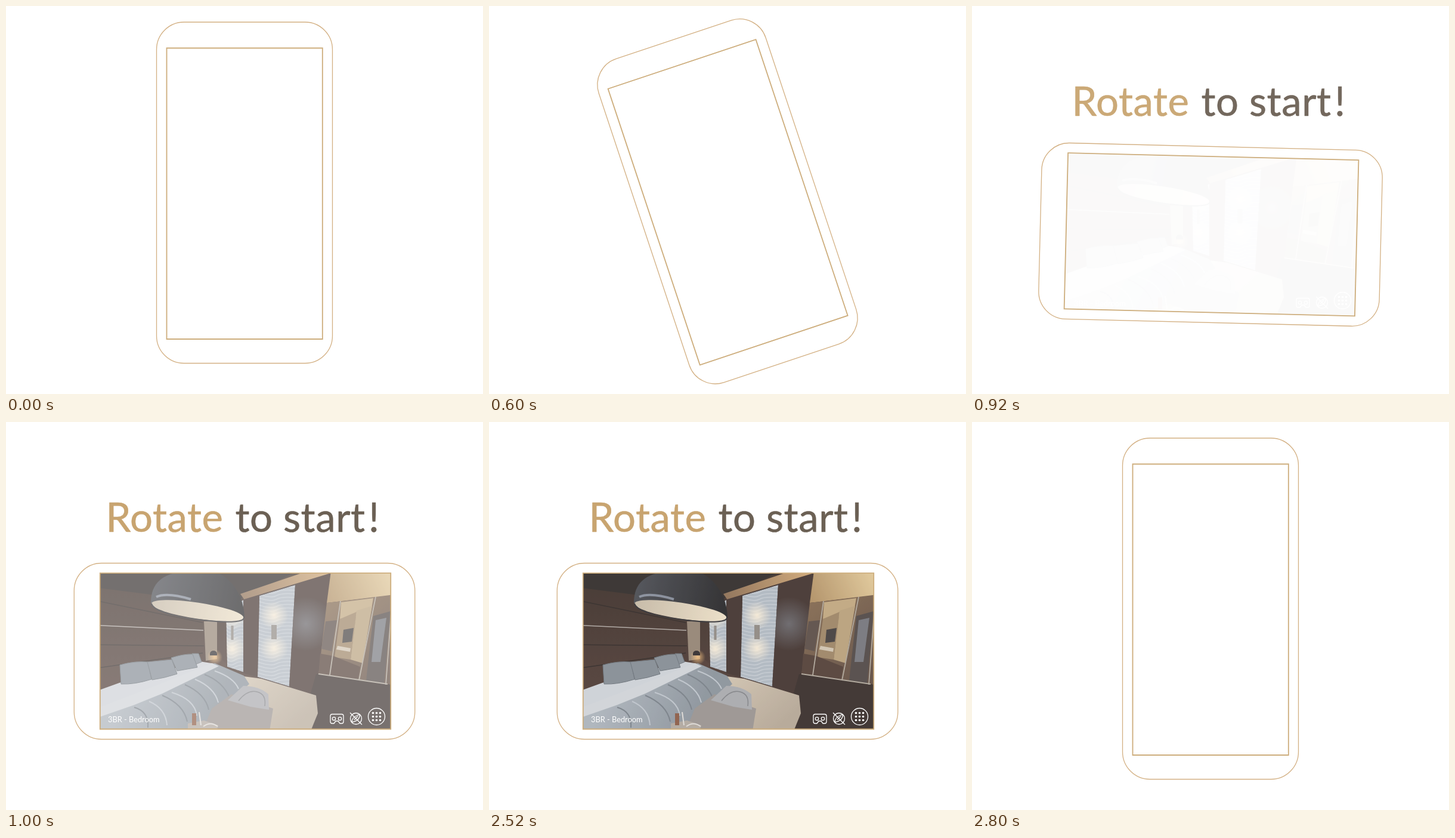
These frames come from a looping animation (800x650 px, 2840 ms). An HTML page with a canvas:

```html
<!DOCTYPE html>
<html lang="en">
<head>
<meta charset="utf-8">
<title>Rotate to start</title>
<style>
  html, body { margin: 0; width: 100%; height: 100%; overflow: hidden; background: #fff; }
  canvas { display: block; }
</style>
</head>
<body>
<canvas id="stage" width="800" height="650"></canvas>
<script>
const LOOP = 2840, STEP = 40;
const ctx = document.getElementById('stage').getContext('2d');
const room = document.createElement('canvas');
room.width = 800;
room.height = 650;

const phone = new Path2D();
phone.roundRect(-147.5, -285.75, 295, 571.5, 46);
const screen = new Path2D();
screen.rect(-130.5, -242.25, 261.3, 487.5);
const bezel = new Path2D(phone);
bezel.addPath(screen);

// The ease-in-out curve, cubic-bezier(.42, 0, .58, 1), between two times
function ease(t, from, to) {
  const x = (t - from) / (to - from);
  if (x <= 0) return 0;
  if (x >= 1) return 1;
  let lo = 0, hi = 1, s;
  for (let i = 0; i < 24; i++) {
    s = (lo + hi) / 2;
    const r = 1 - s;
    if (1.26 * s * r * r + 1.74 * s * s * r + s * s * s < x) lo = s;
    else hi = s;
  }
  return s * s * (3 - 2 * s);
}

function drawRoom(c) {
  const fill = (color, d) => {
    c.fillStyle = color;
    c.fill(new Path2D(d));
  };
  const line = (color, width, d) => {
    c.strokeStyle = color;
    c.lineWidth = width;
    c.stroke(new Path2D(d));
  };
  const shade = (x0, y0, x1, y1, a, b) => {
    const g = c.createLinearGradient(x0, y0, x1, y1);
    g.addColorStop(0, a);
    g.addColorStop(1, b);
    return g;
  };
  const glow = (x, y, r, color, alpha) => {
    const g = c.createRadialGradient(x, y, 0, x, y, r);
    g.addColorStop(0, `rgba(${color},${alpha})`);
    g.addColorStop(1, `rgba(${color},0)`);
    c.fillStyle = g;
    c.fillRect(x - r, y - r, 2 * r, 2 * r);
  };

  // Wall and ceiling
  fill(shade(0, 270, 0, 430, '#25160f', '#36211a'), 'M140 235H660V530H140Z');
  fill('#16100e', 'M140 235H520L393 296 330 300 140 276Z');
  line('#150c09', 1.5, 'M140 297L330 336M140 373L332 375M140 414L330 387');
  line('#a39a94', 1.5, 'M140 340L331 349');
  fill('#857361', 'M332 334H354V397L335 400Z');
  fill(shade(393, 290, 530, 253, '#7d5b3d', '#c2955f'), 'M393 288L505 250H560L400 298Z');

  // Wardrobe panels
  fill('#2a1914', 'M396 298L545 253 520 458 396 420Z');
  const panels = [
    ['M369 318L398 298V419L371 410Z', 369, 398, 353],
    ['M425 291L485 273 475 443 422 427Z', 422, 485, 352]
  ];
  for (const [d, left, right, y] of panels) {
    const mid = (left + right) / 2, w = (right - left) / 7;
    c.save();
    c.clip(new Path2D(d));
    fill('#a4adb7', d);
    for (let k = 270; k < 450; k += 6)
      line('rgba(255,255,255,.25)', 1.5, `M${left} ${k}Q${mid - 8} ${k + 8} ${mid} ${k + 3}T${right} ${k}`);
    glow(mid - 4, y - 28, 24, '255,238,210', .85);
    glow(mid - 4, y + 27, 24, '255,238,210', .85);
    c.restore();
    fill('#7f7871', `M${mid - w / 2 - 4} ${y - 12}h${w}v24h${-w}Z`);
  }
  c.save();
  c.clip(new Path2D('M485 273L545 253 520 458 475 443Z'));
  glow(503, 338, 45, '118,126,138', .55);
  c.restore();

  // Mirrored doors and floor
  fill(shade(540, 300, 646, 253, '#a5804f', '#dcc08a'), 'M545 250H660V289L538 303Z');
  fill(shade(530, 300, 640, 430, '#745639', '#4a3428'), 'M538 303L660 288V442L524 425Z');
  fill('#b79a6d', 'M562 302L616 295 612 318 560 330Z');
  fill('#8f7350', 'M560 330L588 318 578 398 551 394Z');
  fill('#ae9369', 'M588 316L614 308 598 404 578 398Z');
  fill('#46362f', 'M536 334L555 332 546 384 529 380Z');
  fill('#2b2524', 'M566 348L583 345 580 368 564 370Z');
  fill('#c9bba5', 'M556 375L578 379 577 385 554 381Z');
  fill('#3c261c', 'M527 388L549 392 594 410 590 434 524 425Z');
  fill('#39302d', 'M616 325L645 317 634 439 604 433Z');
  fill('#62636a', 'M620 332L638 328 628 402 613 402Z');
  fill('#1e120e', 'M520 422L660 442V530H490Z');
  line('#a2988a', 1.8, 'M561 300L543 424M620 293L592 433M646 320L637 440M524 422L640 439');

  // Rug, bed and bench
  fill(shade(400, 425, 480, 515, '#c8b9a3', '#aa9a87'), 'M398 426L428 430 520 458 523 488 506 530H320Z');
  fill('#3a241c', 'M334 401L362 398 370 405 368 412 340 408Z');
  glow(350, 394, 13, '255,190,110', .8);
  fill('#171213', 'M342 388a6 5 0 0 1 12 0v3h-12Z');
  fill('#c6cad0', 'M140 455L190 437 325 401 350 405 260 455 140 492Z');
  fill(shade(200, 450, 340, 510, '#a0a8b1', '#7b848d'), 'M140 490L275 440 350 404 399 425 408 439 365 478 320 530H140Z');
  fill('#c9cdd2', 'M140 484L240 446 345 404 357 409 262 455 215 474 140 500Z');
  line('#656d76', 2, 'M262 458Q298 473 304 502M300 440Q334 455 340 482M333 423Q364 435 375 462M215 478Q240 485 238 512');
  line('#b4bbc3', 2, 'M278 453Q317 465 320 492M317 431Q350 445 356 470M350 417Q382 428 390 447M240 468Q268 480 270 508');
  for (const d of [
    'M191 407Q216 400 238 402L244 431Q216 440 193 439Z',
    'M237 402L278 398 287 422Q266 429 245 432Z',
    'M312 388L323 388 328 402 318 406Z',
    'M277 395Q300 388 313 389L321 411 287 417Z'
  ]) {
    fill('#747d86', d);
    line('#565e66', 1, d);
  }
  fill('#8b8480', 'M345 480L378 456 448 480 440 530H325Z');
  fill('#9c9da1', 'M372 466L398 442Q424 442 440 456L441 482 410 477Z');
  line('#6f7074', 1.5, 'M390 467Q405 448 421 452T434 476');
  fill('#a59b92', 'M305 505L332 500 356 508 350 530H305Z');
  fill('#7c452d', 'M312 488h7v20h-7Z');
  line('#d8d4cf', 2, 'M324 486L327 508M331 510Q343 501 355 510');

  // Hanging lamp
  fill(shade(243, 270, 400, 300, '#34363d', '#0b0a0c'),
    'M243 303C243 270 262 254 300 250H350C380 262 400 294 400 329Z');
  line('rgba(150,160,178,.7)', 4, 'M252 293Q270 285 310 297');
  c.beginPath();
  c.ellipse(321, 316, 78, 13.5, .15, 0, 7);
  c.fillStyle = shade(244, 300, 399, 328, '#bcae98', '#e9dabe');
  c.fill();
  line('#17161a', 2, 'M244 304C247 319 300 329 340 333S399 334 399 328');

  // Caption and controls
  c.fillStyle = '#fff';
  c.font = '12.8px Lato, sans-serif';
  c.fillText('3BR - Bedroom', 171, 503);
  line('#fff', 1.3, 'M547 489.5H563Q566 489.5 566 492.5V502Q566 505 563 505H560L557 501H553L550 505H547Q544 505 544 502V492.5Q544 489.5 547 489.5Z');
  const ring = (x, y, r) => {
    c.beginPath();
    c.arc(x, y, r, 0, 7);
    c.stroke();
  };
  ring(550, 497, 2.7);
  ring(560, 497, 2.7);
  ring(587, 497, 9.5);
  line('#fff', 1.3, 'M577 487L597 507M580 503Q580 494 593 490Q594 500 580 503M584 499L590 493');
  ring(621.5, 493.5, 14);
  c.fillStyle = '#fff';
  for (let i = 0; i < 9; i++) {
    c.beginPath();
    c.arc(615.5 + i % 3 * 6, 487.5 + Math.floor(i / 3) * 6, 1.8, 0, 7);
    c.fill();
  }
}

function word(text, x, color) {
  ctx.fillStyle = ctx.strokeStyle = color;
  ctx.fillText(text, x, 184);
  ctx.strokeText(text, x, 184);
}

function draw(t) {
  const turn = ease(t, 432, 968) - ease(t, 2528, 2796);
  const title = ease(t, 650, 970) - ease(t, 2528, 2688);
  const photo = ease(t, 900, 1080) - ease(t, 2494, 2584);

  ctx.fillStyle = '#fff';
  ctx.fillRect(0, 0, 800, 650);

  ctx.globalAlpha = title;
  ctx.font = '67px Lato, sans-serif';
  ctx.letterSpacing = '0.6px';
  ctx.lineWidth = 0.6;
  ctx.lineJoin = 'round';
  word('Rotate', 167.5, '#c8a470');
  word('to', 384.5, '#6b6054');
  word('start', 465, '#6b6054');
  word('!', 608, '#6b6054');
  ctx.globalAlpha = 1;

  ctx.save();
  ctx.translate(400, 312.75 + 71.25 * turn);
  ctx.rotate(-Math.PI / 2 * turn);
  ctx.fillStyle = '#fff';
  ctx.fill(bezel, 'evenodd');

  // The picture stays upright while the screen outline turns around it
  ctx.save();
  ctx.clip(screen);
  ctx.resetTransform();
  ctx.globalAlpha = photo;
  ctx.drawImage(room, 0, 0);
  ctx.restore();

  ctx.lineJoin = 'miter';
  ctx.strokeStyle = '#d3b083';
  ctx.lineWidth = 1.3;
  ctx.stroke(phone);
  ctx.strokeStyle = '#cdad7c';
  ctx.lineWidth = 1.8;
  ctx.stroke(screen);
  ctx.restore();
}

function tick() {
  draw(Math.floor(performance.now() % LOOP / STEP) * STEP);
  requestAnimationFrame(tick);
}

drawRoom(room.getContext('2d'));
tick();
</script>
</body>
</html>
```
